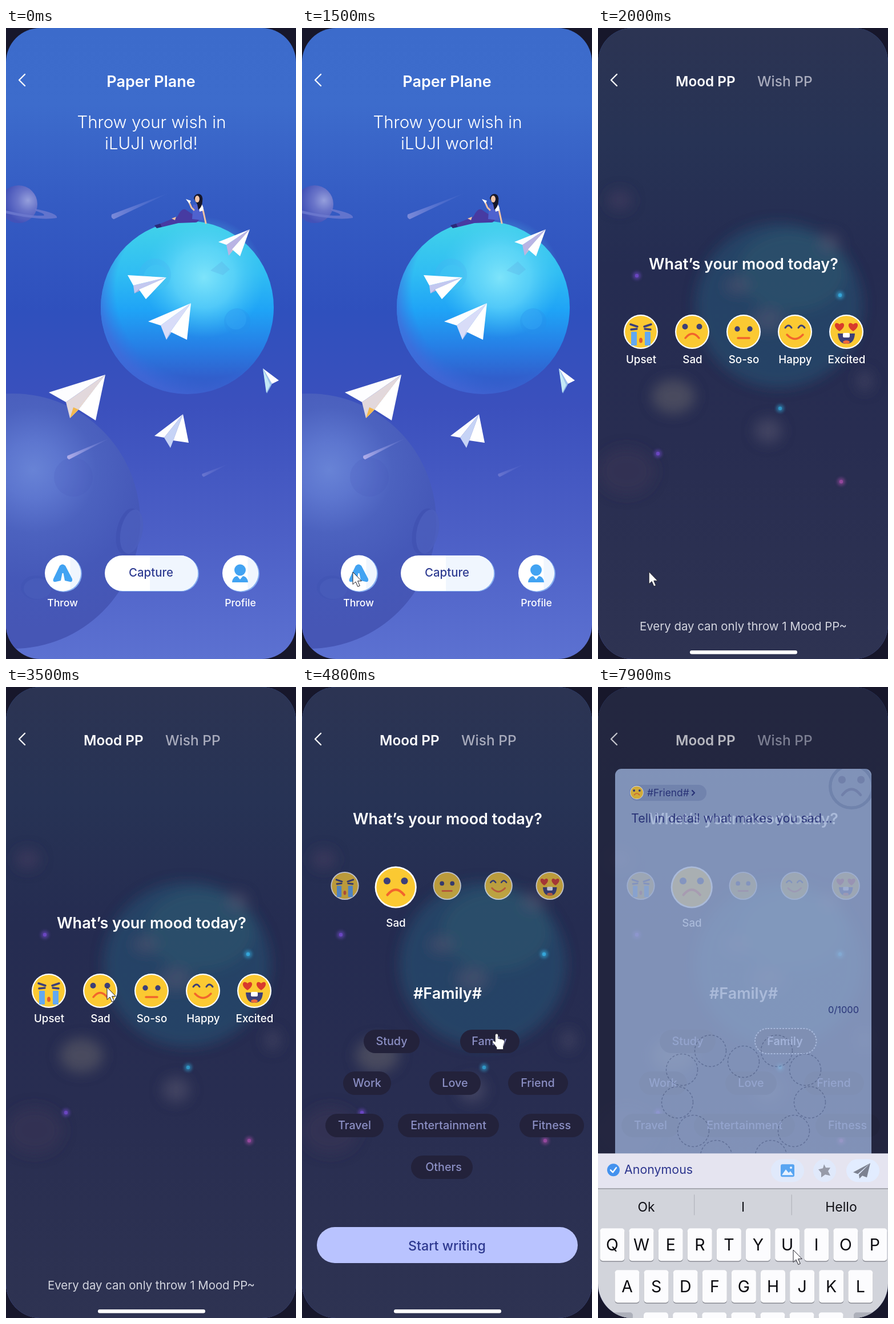
Recreate the animation shown at these times as an HTML page. Size 508 by 1103 pixels, loop 8 s.

```html
<!DOCTYPE html>
<html lang="en">
<head>
<meta charset="utf-8">
<title>Paper Plane</title>
<style>
  html, body { margin: 0; width: 100%; height: 100%; overflow: hidden; background: #17172b; }
  svg { display: block; width: 100%; height: 100%; font-family: Inter, sans-serif; }
</style>
</head>
<body>
<svg id="stage" viewBox="0 0 508 1103" xmlns="http://www.w3.org/2000/svg"></svg>
<script>
const LOOP = 8000;
const NAVY = '#3c3f78';

// ---------- markup helpers ----------
const text = (x, y, s, size, weight = 400, fill = '#fff', anchor = 'middle') =>
  `<text x="${x}" y="${y}" font-size="${size}" font-weight="${weight}" fill="${fill}" text-anchor="${anchor}">${s}</text>`;
const rect = (x, y, w, h, r, fill, extra = '') =>
  `<rect x="${x}" y="${y}" width="${w}" height="${h}" rx="${r}" fill="${fill}" ${extra}/>`;
const circle = (x, y, r, fill, extra = '') => `<circle cx="${x}" cy="${y}" r="${r}" fill="${fill}" ${extra}/>`;
const ellipse = (x, y, rx, ry, fill, extra = '') =>
  `<ellipse cx="${x}" cy="${y}" rx="${rx}" ry="${ry}" fill="${fill}" ${extra}/>`;
const path = (d, fill, extra = '') => `<path d="${d}" fill="${fill}" ${extra}/>`;
const line = (d, stroke, width, extra = '') =>
  path(d, 'none', `stroke="${stroke}" stroke-width="${width}" stroke-linecap="round" stroke-linejoin="round" ${extra}`);
const group = (id, content, extra = '') => `<g id="${id}" ${extra}>${content}</g>`;

const stops = list => list.map(([at, color, alpha = 1]) =>
  `<stop offset="${at}" stop-color="${color}" stop-opacity="${alpha}"/>`).join('');
const vertical = (id, ...list) =>
  `<linearGradient id="${id}" x2="0" y2="1">${stops(list)}</linearGradient>`;
const radial = (id, cx, cy, r, ...list) =>
  `<radialGradient id="${id}" cx="${cx}" cy="${cy}" r="${r}">${stops(list)}</radialGradient>`;

const defs = `<defs>
  ${vertical('sky', [0, '#3c6bcb'], [.12, '#3d6ccc'], [.28, '#345bc3'], [.45, '#2f50bd'], [.6, '#3b50bd'], [.8, '#4c5fc6'], [1, '#5c71d1'])}
  ${vertical('night', [0, '#2c3453'], [.18, '#273355'], [.38, '#252c51'], [.65, '#282d51'], [1, '#2e3352'])}
  ${vertical('world', [0, '#42d3e9'], [.3, '#30bdf3'], [.52, '#1fa3f6'], [.72, '#2680e6'], [.9, '#3160cd'], [1, '#3454c0'])}
  ${radial('glow', .5, .5, .5, [0, '#86e8fb', .9], [.5, '#6cdcfa', .65], [1, '#4acbf5', 0])}
  ${radial('rim', .6, .4, .61, [.84, '#3a6fe0', 0], [1, '#4468d8', .7])}
  ${radial('moon', .75, .4, .62, [0, '#959fdc'], [.45, '#6a75c9'], [1, '#4352b8'])}
  ${radial('giant', .58, .3, .62, [0, '#6883d6'], [.18, '#5d76cf'], [.4, '#4c62bf'], [.7, '#4558b8'], [1, '#4656b5'])}
  <linearGradient id="tail" x2="1" y2="0">${stops([[0, '#c0b8ee', .85], [1, '#9aa4ee', 0]])}</linearGradient>
  <filter id="soft" x="-50%" y="-50%" width="200%" height="200%"><feGaussianBlur stdDeviation="11"/></filter>
  <filter id="tiny" x="-100%" y="-100%" width="300%" height="300%"><feGaussianBlur stdDeviation="2.5"/></filter>
  <clipPath id="phone">${rect(0, 0, 508, 1103, 60, '#fff')}</clipPath>
  <clipPath id="cardClip">${rect(30, 143, 449, 960, 11, '#fff')}</clipPath>
</defs>`;

// ---------- home screen ----------
// Points: tip, outer wing, fold, keel, inner fold, other wing.
function plane(points, shade, keel, side = '#fff') {
  const [tip, wing, fold, bottom, inner, other] = points.split(' ');
  const poly = (fill, ...p) => `<polygon points="${p.join(' ')}" fill="${fill}"/>`;
  return poly(shade, tip, fold, bottom, inner) + poly(keel, tip, bottom, inner) +
    poly('#fdfdff', tip, wing, fold) + poly(side, tip, inner, other);
}
const comet = (x, y, length, thickness, angle, alpha) =>
  `<g transform="translate(${x} ${y}) rotate(${angle})" opacity="${alpha}">` +
  path(`M0 ${-thickness} Q${-thickness} 0 0 ${thickness} L${length} 0Z`, 'url(#tail)') + '</g>';

const world = circle(317.5, 488.5, 151.5, 'url(#world)') + circle(347, 436, 106, 'url(#glow)') +
  circle(261, 431, 28, '#45b4f0', 'opacity=".35"') + circle(263, 436, 22, '#43c8f4', 'opacity=".5"') +
  circle(405, 513, 23, '#2a8fe8', 'opacity=".3"') + circle(403, 509, 18, '#35a9f4', 'opacity=".4"') +
  path('M358 424 L378 408 L392 422 L380 432Z', '#5aa8e0', 'opacity=".3"') +
  circle(317.5, 488.5, 151.5, 'url(#rim)');

const girl =
  path('M268 343 L300 330 Q307 315 314 317 L338 333 Q338 341 328 340 L302 341 L273 348Z', '#473ba2') +
  path('M260 345 L270 342 L273 348 L264 350Z', '#2b2a78') +
  path('M290 333 L298 330 L296 336Z', '#f0c2a4') +
  path('M328 309 L344 308 L345 336 L326 334Z', '#4f62cf') +
  line('M329 318 L325 314 L321 305', '#f0c2a4', 3) +
  line('M345 318 L350 341', '#f0c2a4', 3) +
  path('M337 308 Q346 305 346 319 L339 321Z', '#fff') +
  path('M315 299 L324 302 L321 307Z', '#fff') +
  path('M329 298 Q330 290 338 290 Q346 292 344 303 Q344 312 337 318 L335 308Z', '#17172a') +
  ellipse(335, 299, 4, 6, '#f3c6a8');

const roundButton = x => circle(x + 1.5, 954, 32, '#86aef0') + circle(x, 953, 31.5, '#fff') +
  path(`M${x + 13} 924.5 A31.5 31.5 0 0 1 ${x + 13} 981.5Z`, '#f0f6fe');

const home = rect(0, 0, 508, 1103, 0, 'url(#sky)') +
  circle(22, 308, 33, 'url(#moon)') +
  path('M50 316 Q92 324 89 332 Q60 337 0 324 V319 Q40 329 66 328 Q70 325 53 320Z', '#6e7bd0', 'opacity=".8"') +
  comet(187, 330, 110, 4.5, -23, .6) +
  circle(12, 862, 223, 'url(#giant)') +
  ellipse(214, 880, 20, 41, '#4052b2', 'transform="rotate(12 214 880)" opacity=".8"') +
  ellipse(220, 880, 19, 39, '#4d60bf', 'transform="rotate(12 220 880)" opacity=".8"') +
  ellipse(52, 978, 26, 21, '#4154b3', 'opacity=".5"') + ellipse(55, 980, 24, 18, '#4b5fbd', 'opacity=".6"') +
  circle(118, 785, 34, '#4254b3', 'opacity=".15"') +
  comet(109, 751, 82, 3.5, -25, 1) + comet(345, 782, 50, 3, -24, .35) +
  world + girl +
  plane('427,352 372,374 386,379 390,398 396,387 410,399', '#b9b4e4', '#d9b9cf') +
  plane('281,436 213,432 223,450 225,464 233,457 245,474', '#c3c8f0', '#b7a8d8') +
  plane('324,481 249,513 271,520 281,545 288,531 317,545', '#d8dcf8', '#b8c4ee') +
  plane('174,606 75,637 105,654 112,682 127,667 157,686', '#e2d8dc', '#ead9cf') +
  path('M112 682 L118 663 L127 667Z', '#f3b84e') +
  plane('310,675 260,713 277,716 288,734 293,721 320,725', '#c6d3f6', '#a8bdf0') +
  plane('450,595 478,616 466,622 457,639 463,624 456,638', '#9cc3ee', '#86b4e8', '#c4e9f6') +
  text(254, 103, 'Paper Plane', 27, 600) +
  text(255, 175, 'Throw your wish in', 29.5, 300) + text(254.5, 212, 'iLUJI world!', 29.5, 300) +
  roundButton(99.5) +
  path('M94 940 Q99 935 104 940 L116 963 Q117 969 112 968 L103 966 L100.5 953 H98.5 L96 966 L87 968 Q81 969 83 963Z', '#42a3f2') +
  rect(174, 923, 164, 62, 31, '#86aef0') + rect(173, 922, 163, 62, 31, '#fff') +
  path('M252 922 H305 A31 31 0 0 1 305 984 H252Z', '#f0f6fe') +
  text(254, 959, 'Capture', 20.4, 500, '#2f3c92') +
  roundButton(410.5) +
  circle(410, 947.5, 10, '#42a3f2') + path('M396 969 Q397 959 405 958 L410 964 L415 958 Q423 959 424 969Z', '#42a3f2') +
  text(99, 1011, 'Throw', 17.7, 500) + text(410.5, 1011, 'Profile', 17.7, 500);

// ---------- mood screen ----------
const brow = line('M-18 -13 L-6 -9 M18 -13 L6 -9 M-17 -4 L-7 -5 M17 -4 L7 -5', NAVY, 3.5);
const eyes = (x, y, r) => circle(-x, y, r, NAVY) + circle(x, y, r, NAVY);
const heart = x => path(`M${x} -1 C${x - 14} -10 ${x - 7} -20 ${x} -13 C${x + 7} -20 ${x + 14} -10 ${x} -1Z`, '#d93a2c');
const RED = '#f2642c';
const moods = [
  ['Upset', 75, brow + rect(-17, 0, 10, 24, 1, '#63a9f0') + rect(7, 0, 10, 24, 1, '#63a9f0') + ellipse(0, 15, 3, 4.5, '#e0592f')],
  ['Sad', 165, eyes(12.5, -9, 5) + line('M-12 11 Q0 -4 12 11', RED, 3.5)],
  ['So-so', 255, eyes(11, -5, 4.7) + line('M-10 11 H10', RED, 3.5)],
  ['Happy', 345, line('M-17 -7 Q-11 -15 -6 -7 M17 -7 Q11 -15 6 -7', NAVY, 3) + line('M-14 5 Q0 20 14 5', RED, 3.5)],
  ['Excited', 435, heart(-12) + heart(12) + path('M-15 3 H15 Q14 21 0 21 Q-14 21 -15 3Z', NAVY) +
    rect(-6, 2, 12, 8, 2, '#fff') + ellipse(0, 18, 6, 3, '#ee6a3a')],
];
const face = features => circle(0, 0, 30, '#fff') + circle(0, 0, 27.8, '#fbc932') + features;
const chosen = 1;

const blob = (x, y, rx, ry, fill, alpha) => ellipse(x, y, rx, ry, fill, `opacity="${alpha}"`);
const backdrop = rect(0, 0, 508, 1103, 0, 'url(#night)') + '<g filter="url(#soft)">' +
  blob(317, 485, 146, 144, '#245273', .62) + blob(340, 425, 95, 70, '#2f5a70', .45) +
  blob(245, 450, 22, 14, '#5a5670', .5) + blob(298, 510, 28, 20, '#5a5a72', .5) +
  blob(405, 375, 20, 16, '#5a5670', .5) + blob(132, 644, 38, 30, '#555564', .75) +
  blob(298, 704, 24, 22, '#50506a', .65) + blob(467, 617, 14, 18, '#484a66', .6) +
  blob(38, 301, 22, 18, '#463e60', .6) + blob(50, 775, 50, 42, '#3b3658', .55) + '</g>';
const spark = (x, y, color) => circle(x, y, 7, color, 'filter="url(#tiny)" opacity=".6"') + circle(x, y, 3.2, color);
const sparks = spark(68, 433, '#6a46c0') + spark(424, 467, '#35a5d8') + spark(319, 665, '#3095c4') +
  spark(105, 744, '#6a46c0') + spark(426, 793, '#94489c');

const tag = (label, x, y, w, center) =>
  rect(x, y, w, 41, 20.5, '#23223b') + text(center, y + 27, label, 19.8, 500, '#8b8fc4');
const tags = tag('Study', 108, 599, 98, 157) + tag('Family', 277, 599, 104, 328) +
  tag('Work', 72, 672, 84, 114) + tag('Love', 223, 672, 90, 268) + tag('Friend', 361, 672, 105, 413) +
  tag('Travel', 41, 746, 102, 92) + tag('Entertainment', 168, 746, 177, 256.5) +
  tag('Fitness', 381, 746, 113, 437) + tag('Others', 191, 819, 108, 248);

const tabs = text(136, 102, 'Mood PP', 24.3, 600, '#fff', 'start') +
  text(279, 102, 'Wish PP', 24.5, 500, '#a8abbc', 'start');
const mood = sparks + tabs +
  group('question', text(255, 422, 'What’s your mood today?', 27, 600)) +
  moods.map(([name, x, features], i) =>
    group('face' + i, face(features)) + group('label' + i, text(0, 0, name, 18.8, 500))).join('') +
  group('hint', text(254.5, 1053, 'Every day can only throw 1 Mood PP~', 20.4, 400, '#d3d5df')) +
  group('choices', text(255, 545, '#Family#', 27, 600) + tags +
    rect(26, 944, 457, 63, 31.5, '#b9c3ff') + text(254, 985, 'Start writing', 23.2, 500, '#2e3990')) +
  group('picked', rect(275, 597, 107.5, 44, 22, '#23223b', 'stroke="#e6e8fb" stroke-width="2" stroke-dasharray="3 2.2"') +
    text(327.5, 626, 'Family', 19.8, 600, '#d3d7fb')) +
  rect(161, 1088, 188, 6.5, 3.2, '#fff');

// ---------- writing screen ----------
const petals = [[58, 636], [0, 655], [108, 669], [116, 726], [88, 776], [48, 820]];
const INK = '#29337f';
const card = rect(0, 0, 508, 1103, 0, '#22243c') + `<g opacity=".6">${tabs}</g>` +
  '<g clip-path="url(#cardClip)">' + rect(30, 143, 449, 960, 0, '#96aad1') +
  '<g transform="translate(444 174) scale(1.33)" opacity=".2">' +
  circle(0, 0, 28, 'none', 'stroke="#3a4a80" stroke-width="4"') + eyes(12.5, -9, 5) +
  line('M-12 11 Q0 -4 12 11', NAVY, 3.5) + '</g>' +
  petals.flatMap(([dx, y]) => (dx ? [-dx, dx] : [0]).map(d =>
    circle(255 + d, y, 27.5, 'none', 'stroke="#56668f" stroke-width="1.5" stroke-dasharray="4 3" opacity=".6"'))).join('') + '</g>' +
  rect(55, 171, 135, 28, 14, '#8497c3') +
  `<g transform="translate(68 184.5) scale(.39)">${face(moods[chosen][2])}</g>` +
  text(86, 191, '#Friend#', 17.4, 400, INK, 'start') + line('M165 181 L169 185 L165 189', INK, 2.2) +
  text(58, 237, 'Tell in detail what makes you sad...', 21.5, 400, INK, 'start') +
  text(457, 570, '0/1000', 16.4, 400, INK, 'end');

const key = (x, y, w = 43, fill = '#fcfcfe') => rect(x, y + 1.5, w, 57, 5, '#898b93') + rect(x, y, w, 57, 5, fill);
const keyRow = (letters, firstCenter, y) => [...letters].map((c, i) => {
  const x = firstCenter + i * 51.1;
  return key(x - 21.5, y) + text(x, y + 39, c, 28.5, 400, '#0b0b10');
}).join('');
// Drawn at the height where its top edge is y = 817.
const keyboard = rect(0, 817, 508, 62, 0, '#e5e4f0') + rect(0, 878, 508, 440, 0, '#d2d4db') +
  rect(0, 878, 508, 1.3, 0, '#8f919a') +
  circle(27, 846, 11, '#4492ee') + line('M22 846 L26 850 L32 842', '#fff', 2.4) +
  text(46, 853, 'Anonymous', 21.4, 400, '#2d368e', 'start') +
  rect(303, 827, 58, 40, 20, '#e0e9fb') + rect(320, 836, 24, 22, 3, '#58a5f2') +
  path('M322 855 L329 845 L334 851 L337 848 L342 855Z', '#e7f1ff') + circle(338, 842, 2, '#e7f1ff') +
  rect(377, 827, 40, 40, 20, '#e0e9fb') +
  path('M396 836 L399 842 L407 842 L403 848 L407 856 L398 854 L391 859 L391 851 L386 845 L394 843Z', '#969aa8') +
  rect(435, 827, 58, 40, 20, '#e2ecff') +
  path('M477 834 L447 850 L455 853Z M477 834 L457 854 L458 861 L463 856 L471 859Z', '#7c8190') +
  text(84.5, 919, 'Ok', 23, 400, '#101016') + text(254, 919, 'I', 23, 400, '#101016') + text(426, 919, 'Hello', 23, 400, '#101016') +
  rect(168, 889, 1.3, 36, 0, '#b4b6be') + rect(338.5, 889, 1.3, 36, 0, '#b4b6be') +
  keyRow('QWERTYUIOP', 25, 948) + keyRow('ASDFGHJKL', 51, 1021) + keyRow('ZXCVBNM', 101.5, 1095) +
  key(4, 1095, 57, '#adb0ba') + key(448, 1095, 57, '#adb0ba');

const cursor =
  group('arrow', path('M0 0 V21.5 L5 17 L8.7 25.5 L12.3 24 L8.6 15.7 H15.3Z', '#fff', 'stroke="#20202a" stroke-width="1"')) +
  group('hand', path('M-2.5 2.5 Q-2.3 0 0 0 Q2.3 0 2.5 2.5 V8.5 L10 10 Q14 11 13.6 15 L11.5 22 V27.5 H0 V24 L-7 15.5 Q-8.3 12 -5 12.5 L-2.5 14.5Z', '#fff', 'stroke="#20202a" stroke-width=".7"'));

const stage = document.getElementById('stage');
stage.innerHTML = defs + `<g clip-path="url(#phone)">` +
  group('home', home) + group('backdrop', backdrop) + group('mood', mood) + group('write', card) +
  line('M33 81 L23 91 L33 101', '#fff', 2.4, 'id="back"') +
  group('keyboard', keyboard) + '</g>' + group('cursor', cursor);

// ---------- motion ----------
const el = id => document.getElementById(id);
const mix = (a, b, p) => a + (b - a) * p;
const clamp = v => Math.max(0, Math.min(1, v));
const transition = (t, start, power = 2) => 1 - (1 - clamp((t - start) / 300)) ** power;
const inOut = p => p < .5 ? 4 * p ** 3 : 1 - 4 * (1 - p) ** 3;
const fade = (id, alpha) => el(id).setAttribute('opacity', alpha);
const place = (id, x, y, scale = 1) => el(id).setAttribute('transform', `translate(${x} ${y}) scale(${scale})`);

const cursorPath = [
  [500, 300, 1110], [1250, 89, 951], [1950, 89, 951], [2700, 243, 547], [3000, 177, 525],
  [3850, 177, 525], [4300, 341, 606], [6000, 341, 606], [6400, 346, 939], [6700, 342, 984], [LOOP, 342, 984],
];
function cursorAt(t) {
  const i = cursorPath.findIndex(k => k[0] > t);
  if (i < 1) return cursorPath[0].slice(1);
  const [t0, x0, y0] = cursorPath[i - 1], [t1, x1, y1] = cursorPath[i];
  const p = inOut((t - t0) / (t1 - t0));
  return [mix(x0, x1, p), mix(y0, y1, p)];
}

function render(t) {
  const select = transition(t, 3550);
  const write = transition(t, 7774, 3);

  // The dark backdrop leads, its content follows.
  fade('backdrop', transition(t, 1580));
  fade('mood', transition(t, 1620));
  place('question', 0, -182 * select);
  moods.forEach(([, x], i) => {
    const isChosen = i === chosen;
    place('face' + i, x - select * (i ? .8 : 0), mix(531, isChosen ? 350 : 347.5, select), mix(1, isChosen ? 1.22 : .82, select));
    fade('face' + i, isChosen ? 1 : mix(1, .7, select));
    place('label' + i, x + .5 - select, mix(586, isChosen ? 419 : 404, select));
    fade('label' + i, isChosen ? 1 : 1 - select);
  });
  fade('hint', 1 - select);
  fade('choices', select);
  fade('picked', transition(t, 4900));
  fade('write', write);
  fade('back', 1 - .35 * write);
  place('keyboard', 0, 286 - 431 * transition(t, 7774));

  const hand = (t >= 4300 && t < 6000) || (t >= 6600 && t < 7200);
  fade('hand', hand ? 1 : 0);
  fade('arrow', hand ? 0 : 1);
  place('cursor', ...cursorAt(t));
}

function tick() {
  render(performance.now() % LOOP);
  requestAnimationFrame(tick);
}
tick();
</script>
</body>
</html>
```
